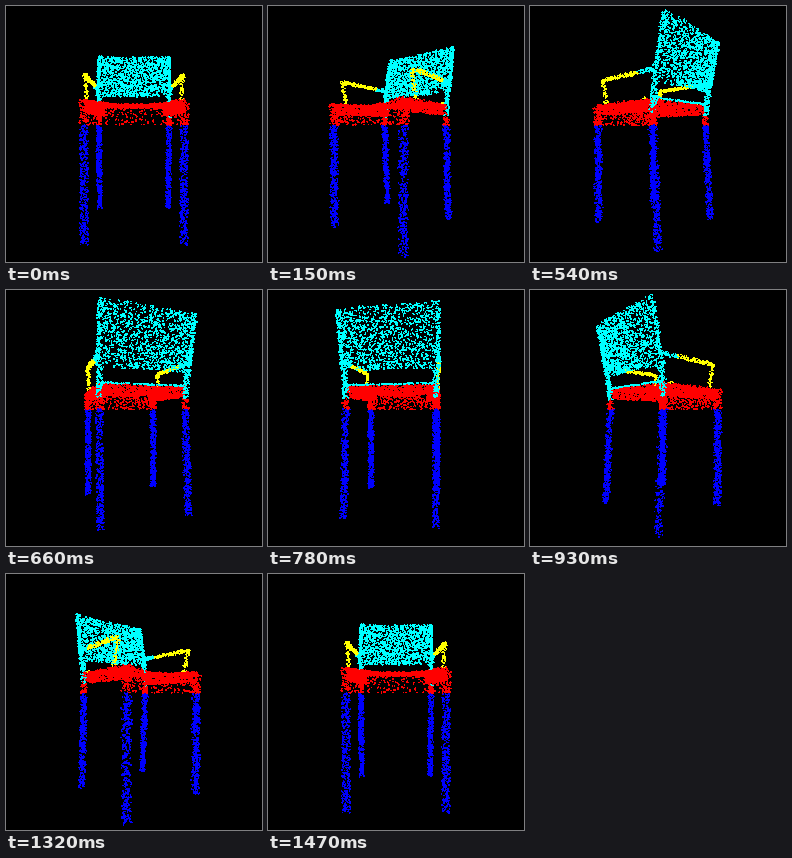
Animation of 256 by 256 pixels, one loop 1500 ms. Source, as a matplotlib script:

```python
import numpy as np
import matplotlib.pyplot as plt
from matplotlib.animation import FuncAnimation

SIZE, FRAMES, INTERVAL = 256, 50, 30
FOCAL, DIST, HORIZON = 221.7, 2.0, 121
DOT = 0.9  # dot radius in pixels
BLUE, RED, CYAN, YELLOW = (0, 0, 255), (255, 0, 0), (0, 255, 255), (255, 255, 0)

# chair outline: half width, then heights and depths
WIDE = 0.36
FLOOR, LEG_TOP, SEAT, ARM, BACK_LOW, BACK_TOP = -0.85, 0.015, 0.2, 0.4, 0.315, 0.765
FRONT, REAR = 0.4, -0.275

rng = np.random.default_rng(7)
cloud, tints = [], []


def add(x, y, z, color):
    cloud.append(np.column_stack([x, y, z]))
    tints.append(np.tile(color, (len(x), 1)))


def jitter(n, half):
    return rng.uniform(-half, half, n)


def bars(start, end, half, color, x=WIDE):
    """A left and a right bar between two (height, depth) points."""
    (y0, z0), (y1, z1) = start, end
    length = np.hypot(y1 - y0, z1 - z0)
    n = int(17000 * half * length)
    for side in (-x, x):
        t, off = rng.random(n), jitter(n, half)
        add(side + jitter(n, half),
            y0 + t * (y1 - y0) - off * (z1 - z0) / length,
            z0 + t * (z1 - z0) + off * (y1 - y0) / length, color)


def sag(x):
    return 0.04 * (1 - (x / WIDE) ** 2)


def add_seat(n):
    x, depth = jitter(n, WIDE), rng.random(n)
    y = SEAT - depth * sag(x) + jitter(n, 0.008)
    add(x, y, REAR + depth * (FRONT - REAR), RED)


def add_apron(n):
    x = jitter(n, WIDE)
    y = LEG_TOP + rng.random(n) * (SEAT - sag(x) - LEG_TOP)
    add(x, y, FRONT + jitter(n, 0.02), RED)


def add_backrest(n):
    x, t = jitter(n, WIDE + 0.03), rng.random(n)
    y = BACK_LOW + t * (BACK_TOP - BACK_LOW)
    add(x, y, -0.3 - 0.1 * t - sag(x) / 2 + jitter(n, 0.014), CYAN)


def add_rail(n):
    add(jitter(n, WIDE), SEAT + 0.01 + jitter(n, 0.005), REAR + jitter(n, 0.01), CYAN)


# legs
bars((FLOOR, FRONT), (LEG_TOP, FRONT), 0.028, BLUE)
bars((FLOOR, REAR - 0.05), (LEG_TOP, REAR), 0.026, BLUE)

# seat and its frame
bars((LEG_TOP, FRONT), (SEAT, FRONT), 0.034, RED)
bars((LEG_TOP, REAR), (0.1, REAR), 0.026, RED)
bars((0.155, REAR), (0.155, FRONT), 0.045, RED, x=WIDE - 0.025)
add_seat(1000)
add_apron(260)

# backrest, its posts and lower rail
bars((0.1, REAR), (BACK_LOW, -0.3), 0.023, CYAN)
bars((BACK_LOW, -0.3), (BACK_TOP, -0.4), 0.015, CYAN, x=WIDE + 0.015)
add_backrest(1450)
add_rail(130)

# armrests
bars((ARM, -0.15), (ARM, 0.32), 0.015, YELLOW, x=WIDE + 0.02)
bars((ARM, -0.3), (ARM, -0.15), 0.015, CYAN, x=WIDE + 0.02)
bars((SEAT, 0.26), (ARM, 0.31), 0.014, YELLOW, x=WIDE + 0.01)
bars((SEAT + 0.01, -0.22), (SEAT + 0.01, -0.17), 0.008, YELLOW)

X, Y, Z = np.concatenate(cloud).T
COLORS = np.concatenate(tints).astype(np.uint8)


def project(i):
    # the first and last views coincide
    angle = 2 * np.pi * i / (FRAMES - 1)
    c, s = np.cos(angle), np.sin(angle)
    near = Z * c + X * s
    scale = FOCAL / (DIST - near)
    order = np.argsort(near)
    px = SIZE / 2 + scale * (X * c - Z * s)
    py = HORIZON - scale * Y
    return px[order], py[order], COLORS[order]


def render(i):
    px, py, color = project(i)
    # each row holds one dot's 3 by 3 neighbourhood, far dots first
    dy, dx = np.mgrid[-1:2, -1:2].reshape(2, 1, 9)
    col = np.floor(px)[:, None].astype(int) + dx
    row = np.floor(py)[:, None].astype(int) + dy
    inside = np.hypot(col + 0.5 - px[:, None], row + 0.5 - py[:, None]) < DOT
    inside &= (row >= 0) & (row < SIZE) & (col >= 0) & (col < SIZE)
    image = np.zeros((SIZE, SIZE, 3), np.uint8)
    image[row[inside], col[inside]] = np.repeat(color, inside.sum(axis=1), axis=0)
    return image


fig = plt.figure(figsize=(2.56, 2.56), dpi=100, facecolor="black")
ax = fig.add_axes([0, 0, 1, 1])
ax.axis("off")
view = ax.imshow(render(0), interpolation="nearest", aspect="auto")


def draw(i):
    view.set_data(render(i))
    return (view,)


anim = FuncAnimation(fig, draw, frames=FRAMES, interval=INTERVAL,
                     repeat=True, repeat_delay=0)
plt.show()
```
